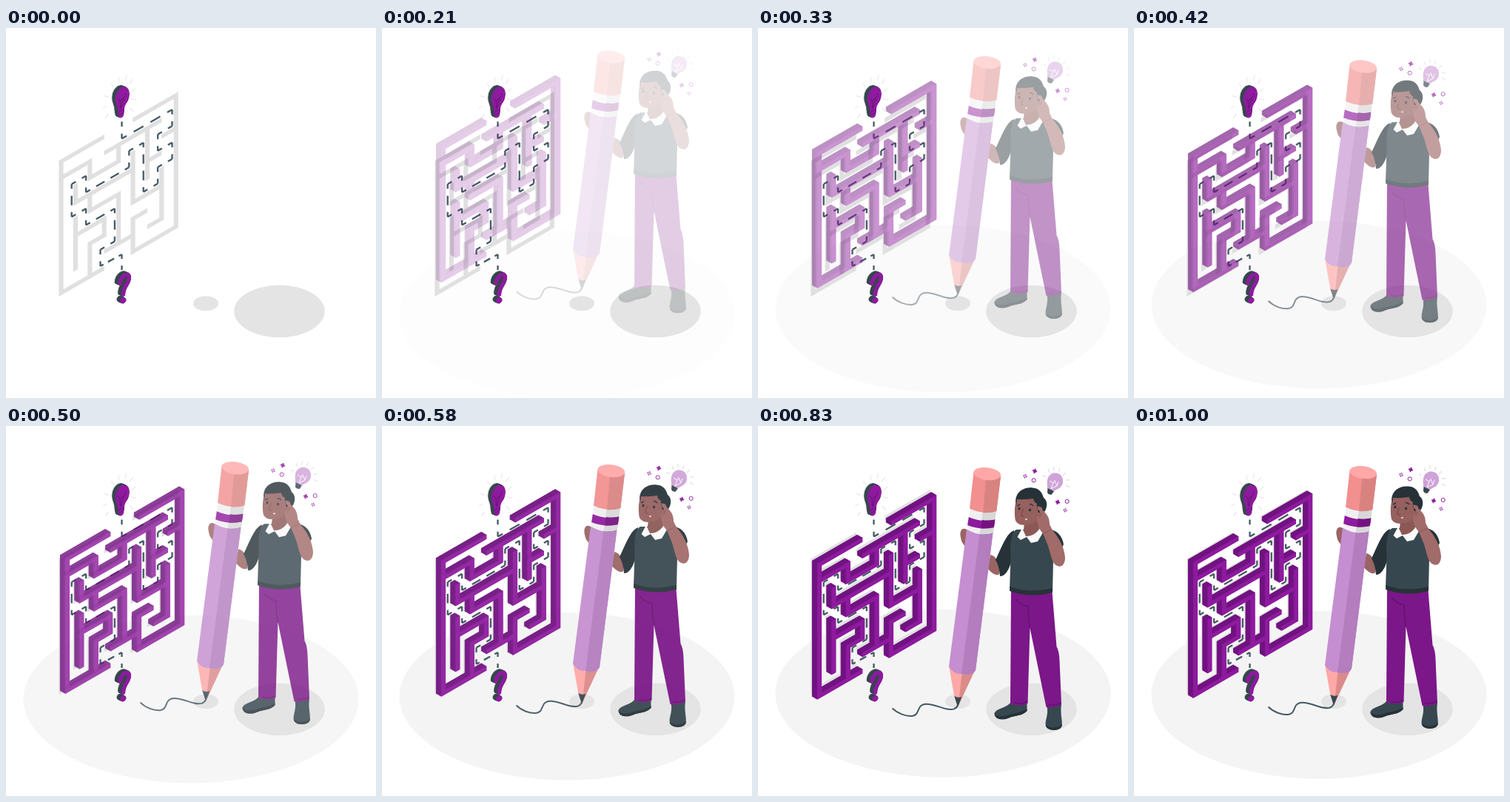
An HTML page that plays this animation: 500 px wide and 500 px high, repeating every 1.04 s.

```html
<!DOCTYPE html>
<html lang="en">
<head>
<meta charset="utf-8">
<title>Maze and pencil</title>
<style>
html, body { margin: 0; width: 100%; height: 100%; overflow: hidden; background: #fff; }
svg { display: block; width: 100vw; height: 100vh; }
</style>
</head>
<body>
<svg viewBox="0 0 500 500" fill="none">
  <defs>
    <path id="walls" fill="none" stroke-width="6.2" stroke-linecap="square" transform="matrix(1 -.577 0 1 0 0)"/>
    <path id="idea" stroke="none" d="M148 94C149 85 155 78.500 161 79.500C168 81 168 92 164.500 99C161 104 160 106 160 111L159 118C157 122.500 152 122.500 152 118L151 112C152 108 147 102 148 94Z"/>
    <g id="ask" fill="none" stroke-linecap="round">
      <path stroke-width="5.400" d="M154 345C155 336 164 329.500 166.300 335.500C168 345 158.500 348 158.500 360"/>
      <path stroke-width="7.500" d="M158 368.500l.6-.8"/>
    </g>
    <path id="spark" d="M0-3.200Q.5-.5 3.200 0Q.5.5 0 3.200Q-.5.5-3.200 0Q-.5-.5 0-3.200Z"/>
  </defs>

  <ellipse id="floor" cx="250" cy="363.300" rx="226.500" ry="113.300" fill="#f4f4f4"/>

  <g id="still">
    <ellipse cx="369.500" cy="382.800" rx="61.300" ry="35.300" fill="#e4e4e4"/>
    <ellipse cx="270" cy="372.200" rx="17" ry="10" fill="#e4e4e4"/>
    <use href="#walls" x="74.500" y="180.500" stroke="#e0e0e0"/>
    <g id="dashes" stroke="#455a64" stroke-width="2.300" stroke-dasharray=".58 .42" stroke-dashoffset=".29"/>
    <path stroke="#ebebeb" stroke-width="1.300" d="M152 66l1 7M163 64l-2 7M172 69l-5 6M175 82l-5 4M176 97l-7-1M172 113l-4-5M142 75l4 5M133 92l6 1M131 108l5-3M134 122l5-6"/>
    <g id="icons"/>
    <path stroke="#5d126a" stroke-width=".8" d="M155 109L154 98L151 94M155 109L159 95L162 89M154 98L159 95M152 114l7-4M153 118l6-4"/>
  </g>

  <g id="drop">
    <g id="maze"/>

    <path d="M181.500 379.500C189 387 200 390.500 208 390C220 389 213 374.500 227 373.800C241 373.500 254 384 265 380.500Q269 378.500 270 375" stroke="#455a64" stroke-width="2"/>
    <path d="M282 138C275 134 272 141 274 149C275 156 279 160 283 163L287 150Z" fill="#9a6463"/>

    <g id="man">
      <path d="M341 372C336 379 320 380 319.500 387C320 395 331 396 339 392.500C347 389 357 390 363.500 383V371Z" fill="#37474f"/>
      <path d="M319.500 386C320 395 331 396 339 392.500C347 389 357 390 363.500 383V380C354 387 346 385 337 389Q324 393 319.500 386Z" fill="#263238"/>
      <path d="M390.500 376C393 390 387 396 389 404C393 410.500 407 410.500 410.500 404C412 396 408 388 410 374Z" fill="#37474f"/>
      <path d="M389 402C395 407 405 407 411 401Q411 408 400 409Q390 409 389 402Z" fill="#263238"/>
      <path d="M342 216L341 373Q353 378 364.500 373L367.500 271L389.500 378Q401 380 410 374L407.500 315Q407 302 403.500 296L397 216Z" fill="#7b1788"/>
      <path d="M348 232Q355 240 365 242Q365 258 367.500 271M347 372q10 3 17-2M393 375q10 1 16-3" stroke="#611069" stroke-width="1.200"/>

      <path d="M314 172C322 174 328 183 326 198C321 202 315 195 310 191Z" fill="#9a6463"/>
      <path d="M346 139C336 143 331 158 321 179Q326 187 327 201Q337 201 343 179Z" fill="#263238"/>
      <path d="M349 138C341 143 341 158 341.500 175L340 219Q366 229 398 221L399 180C398 158 394 145 386 138Z" fill="#37474f"/>
      <path d="M340.500 215Q366 225 398 217V223Q369 231 340 221Z" fill="#263238"/>
      <path d="M392 137C404 139 411 146 413 158L408 168L396 152Z" fill="#263238"/>

      <path d="M360 129L382 120L384 139Q374 153 358 146Z" fill="#8c5855"/>
      <path d="M357 136L350.500 148L355 152L363 148L369 156L378 154L384.500 143L382 134Q375 147 362 147Z" fill="#fafafa"/>
      <path d="M350 96C346 106 346.500 116 347.500 124C349 131 357 133 364 131.500C374 130 383 123 385 113L382 92Z" fill="#95605e"/>
      <path d="M348 99C349 86 360 80.500 371 81.500C380 82 384 88 386 95C392 99 391 109 387 114L379 113Q376 108 377 103Q372 100 372 96Q358 98 350 97L349 105Z" fill="#263238"/>
      <ellipse cx="381" cy="112" rx="3.500" ry="5" fill="#95605e"/>
      <g fill="#263238"><ellipse cx="353" cy="109.500" rx="1.500" ry="2"/><ellipse cx="367.500" cy="111.500" rx="1.500" ry="2"/><circle cx="380" cy="113" r="2"/></g>
      <path d="M350 106l4-2M367 103.500q3 0 5 2.500" stroke="#263238" stroke-width="1.500"/>
      <path d="M358.500 110Q355 119 356.500 120L360 120" stroke="#734442"/>
      <path d="M360.500 124q2-1.500 3.500-.5l-1 2Z" fill="#f5dede"/>

      <path d="M377 107C381 105 383 110 386 113C391 118 394 122 394 131L398 139C407 149 414 162 415 176C415 184 411 189 406 187.500C398 186 397 177 392 160L385 143C378 136 377 128 377 121L383 118Z" fill="#a16b69"/>
      <path d="M384 116l-4 7M386 143l11-5" stroke="#845250" stroke-width=".8"/>
    </g>

    <g id="pencil">
      <path d="M258 322L265 362L270 377.500L294 326Z" fill="#ffa8a7"/>
      <path d="M276 328L272 364L270 377.500L294 326Z" fill="#db8b89"/>
      <path d="M265.300 363Q270 366 275.300 364L270 378Z" fill="#37474f"/>
      <path d="M282 137.500Q299 148 317.500 142L294 328Q290 336 275 333Q263 333 258 323Z" fill="#c58ed0"/>
      <path d="M299.500 144Q309 145 317.500 142L294 328Q290 336 275 333Z" fill="#b37dbe"/>
      <path d="M287 108L282.200 137.500Q300 147 318 142L322 112Z" fill="#f0f0f0"/>
      <path d="M304 112L299.500 144Q310 145 318 142L322 112Z" fill="#d8d8d8"/>
      <path d="M284.800 121Q302 129 320.300 124.500L318.800 135Q300 139 283.100 132Z" fill="#8e1a9e"/>
      <path d="M302.800 125Q312 126.500 320.300 124.500L318.800 135Q310 137 301.300 136.500Z" fill="#741380"/>
      <path d="M291.500 60L286 109.500Q303 118 322.300 113L328 66Z" fill="#f28f8f"/>
      <path d="M308.500 66L304 115Q314 116 322.300 113L328 66Z" fill="#d98381"/>
      <ellipse cx="309.700" cy="62.700" rx="18.400" ry="8.400" fill="#ffa8a7" transform="rotate(7 309.700 62.700)"/>
    </g>

    <g id="thought">
      <path d="M400 53v5M408 55l-1.500 5M416 61l-4 4M421 71h-5M421 81l-5-3M392 56l2 5M385 65l4 2" stroke="#e0e0e0" stroke-width="1.300"/>
      <path d="M391.500 81L400 86L397 90.500Q393 92 391 88Z" fill="#37474f"/>
      <path d="M391.500 82C390 74 390 65 398 62C407 60 413 66 412 74C411 82 404 83 400 86Z" fill="#cfa3d8"/>
      <path d="M396 83L399 75L394 72M396 83L404 79L406 73M399 75l2-3l3 7" stroke="#f3e6f5" stroke-width="1.200"/>
      <g id="sparks" stroke="#8e1a9e"><circle cx="372.700" cy="71.500" r="2.600"/><circle cx="417.700" cy="100" r="2.600"/></g>
    </g>
  </g>
</svg>
<script>
const $ = id => document.getElementById(id);
const COL = 19.4, ROW = 22.2, RISE = 11.2;
const LIGHT = '#8e1a9e', DARK = '#711380', INK = '#37474f';

// Maze walls as polylines of "column,row" points
const walls = `2.85,0 0,0 0,8 2.85,8|5.15,0 8,0 8,8 5,8 5,6 5.85,6|0,1 2,1 2,2 4,2 4,1
|3.15,1 6.85,1|6,1 6,4|6,3 6.85,3|7.15,2 8,2|1,2 1,3 5,3|5,2 5,5 7,5|7,4 7,7 6.15,7
|2,3 2,4 4,4 4,7|3.15,7 5,7|1,4 1,7|1,5 3,5 3,6 2,6 2,8`;
$('walls').setAttribute('d', walls.split('|').map(line => 'M' + line.trim().split(' ').map(p => {
  const [i, j] = p.split(',');
  return `${i * COL} ${j * ROW}`;
}).join('L')).join(''));

// Copies of a shape swept along a vector give it depth
const use = (id, x, y, color) => `<use href="#${id}" x="${x}" y="${y}" fill="${color}" stroke="${color}"/>`;
function solid(id, x, y, dx, dy, side, front) {
  let out = '';
  for (let k = 0; k < 14; k++) out += use(id, x + dx * k / 14, y + dy * k / 14, side);
  return out + use(id, x + dx, y + dy, front);
}
$('maze').innerHTML = solid('walls', 76, 181.5, 7, 4, DARK, LIGHT);
$('icons').innerHTML = ['idea', 'ask'].map(id =>
  use(id, -5.5, -2.5, '#e0e0e0') + solid(id, -4.5, -2, 4.5, 2, INK, LIGHT)).join('');

// Dashed solution: every segment is split into whole dash periods
let pen = [156.5, 126.5], dashes = '';
function dashTo(x, y, n) {
  dashes += `<path d="M${pen}L${x} ${y}" pathLength="${n}"/>`;
  pen = [x, y];
}
dashTo(156.5, 149.5, 1);
dashTo(224.5, 110.3, 3);
const steps = { u: [0, -ROW], d: [0, ROW], l: [-COL, RISE], r: [COL, -RISE] };
for (const [dir, n] of 'd1 l1 d1 r1 d1 l1 d1 l1 u3 l1 d1 l3 u1 l1 d2 r1 d1 r2 d2 l1 d1'.split(' ')) {
  const [dx, dy] = steps[dir];
  dashTo(pen[0] + dx * n, pen[1] + dy * n, +n);
}
dashTo(156.5, 306, 2);
dashTo(156.5, 327, 1);
$('dashes').innerHTML = dashes;

for (const [x, y, size, turn, fill] of [[361, 66, .85, 20, 'none'], [374, 59, 1, 15, LIGHT],
  [405, 101, 1, 15, LIGHT], [415, 112, .8, 20, 'none']])
  $('sparks').innerHTML += `<use href="#spark" fill="${fill}" transform="translate(${x} ${y}) rotate(${turn}) scale(${size})"/>`;

// Overshooting cubic-bezier(.36, -.01, .5, 1.38)
const bezier = (a, b, s) => 3 * a * s * (1 - s) ** 2 + 3 * b * s * s * (1 - s) + s ** 3;
function ease(x) {
  let lo = 0, hi = 1;
  for (let k = 0; k < 24; k++) {
    const mid = (lo + hi) / 2;
    if (bezier(.36, .5, mid) < x) lo = mid; else hi = mid;
  }
  return bezier(-.01, 1.38, lo);
}

const LOOP = 1040, TICKS = 25;
const start = performance.now();
function draw(now) {
  const t = Math.max(0, now - start) % LOOP;
  const tick = Math.min(TICKS - 1, Math.floor((t + 5) * TICKS / LOOP));
  const p = tick < 2 ? 0 : ease(Math.min(1, (tick + .8) / 24));
  for (const [id, from] of [['drop', -30], ['floor', 30]]) {
    $(id).setAttribute('transform', `translate(0 ${from * (1 - p)})`);
    $(id).setAttribute('opacity', Math.max(0, Math.min(1, p)));
  }
  requestAnimationFrame(draw);
}
draw(start);
</script>
</body>
</html>
```
